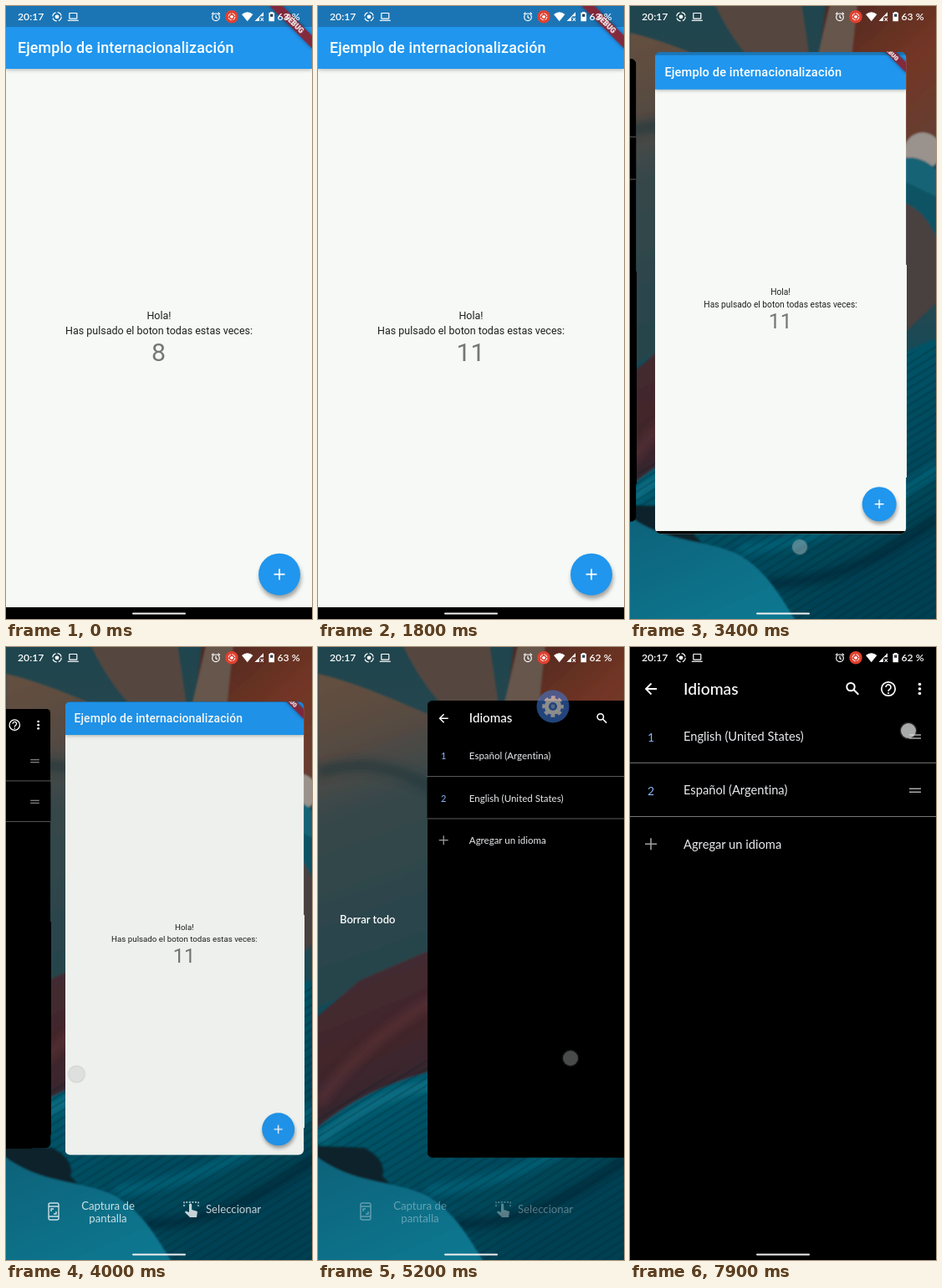
These frames come from a looping animation (366x732 px, 8000 ms). An HTML page:

```html
<!DOCTYPE html>
<html lang="es">
<head>
<meta charset="utf-8">
<title>Ejemplo de internacionalización</title>
<style>
html, body { margin: 0; width: 100%; height: 100%; overflow: hidden; background: #000; }
#stage { position: relative; width: 366px; height: 732px; overflow: hidden; }
#stage > * { position: absolute; left: 0; top: 0; }
svg { display: block; width: 366px; height: 732px; }
text { font-family: Lato, "Open Sans", sans-serif; font-variant-ligatures: none; fill: #fff; }
.mid { text-anchor: middle; }
.line { fill: none; stroke: #fff; }
.app text { font-family: Roboto, Arial, sans-serif; }
.app .body { font-size: 12.5px; fill: #1f1f1f; }
.app .count { font-size: 30.4px; fill: #757775; }
.item { font-size: 14.7px; fill: #e8eaed; }
.num { font-size: 14px; fill: #8ab4f8; }

.card { width: 366px; height: 732px; transform-origin: 0 0; }
.app { animation: app 8s ease-in-out infinite; }
.settings { animation: settings 8s ease-in-out infinite; }
.dim { animation: dim 8s linear infinite; }
.icon { animation: icon 8s ease-in-out infinite; }
.actions { animation: actions 8s linear infinite; }
.clear { animation: clear 8s linear infinite; }
.touch { animation: touch 8s linear infinite; }
.ripple { transform-origin: 327px 679px; animation: ripple 8s ease-out infinite; }
.rowA { animation: rowA 8s ease-in-out infinite; }
.rowB { animation: rowB 8s linear infinite; }
.step { animation: 8s step-end infinite; }
.n8 { animation-name: n8; } .n9 { animation-name: n9; }
.n10 { animation-name: n10; } .n11 { animation-name: n11; }
.b63 { animation-name: b63; } .b62 { animation-name: b62; }
.pre { animation-name: pre; } .post { animation-name: post; }

@keyframes n8 { 0% { opacity: 1 } 3.75%, 100% { opacity: 0 } }
@keyframes n9 { 0% { opacity: 0 } 3.75% { opacity: 1 } 10%, 100% { opacity: 0 } }
@keyframes n10 { 0% { opacity: 0 } 10% { opacity: 1 } 16.25%, 100% { opacity: 0 } }
@keyframes n11 { 0% { opacity: 0 } 16.25%, 100% { opacity: 1 } }
@keyframes b63 { 0% { opacity: 1 } 57.5%, 100% { opacity: 0 } }
@keyframes b62 { 0% { opacity: 0 } 57.5%, 100% { opacity: 1 } }
@keyframes pre { 0% { opacity: 1 } 87%, 100% { opacity: 0 } }
@keyframes post { 0% { opacity: 0 } 87%, 100% { opacity: 1 } }

@keyframes app {
  0%, 34% { transform: none; clip-path: inset(0 0 0 0 round 0px); }
  38% { transform: translate(14px, 17px) scale(.915); clip-path: inset(10px 0 5px 0 round 6px); animation-timing-function: ease-out; }
  42.5% { transform: translate(30px, 38.2px) scale(.82); clip-path: inset(20px 0 10px 0 round 8px); }
  47.5%, 49.2% { transform: translate(39.3px, 44.8px) scale(.785); clip-path: inset(24px 0 14px 0 round 8px); animation-timing-function: linear; }
  55% { transform: translate(263px, 57px) scale(.749); clip-path: inset(24px 0 14px 0 round 8px); animation-timing-function: ease-out; }
  58.75%, 60.6% { transform: translate(363px, 58px) scale(.749); clip-path: inset(24px 0 14px 0 round 8px); }
  65%, 100% { transform: translate(450px, 58px) scale(.749); clip-path: inset(24px 0 14px 0 round 8px); }
}
@keyframes settings {
  0%, 36% { transform: translate(-400px, 46px) scale(.79); clip-path: inset(24px 0 14px 0 round 8px); }
  42.5% { transform: translate(-282px, 47px) scale(.79); clip-path: inset(20px 0 12px 0 round 8px); }
  47.5%, 49.2% { transform: translate(-255px, 56px) scale(.755); clip-path: inset(24px 0 14px 0 round 8px); animation-timing-function: linear; }
  55% { transform: translate(-28px, 51.6px) scale(.76); clip-path: inset(24px 0 12px 0 round 8px); animation-timing-function: ease-out; }
  58.75%, 60.6% { transform: translate(38.4px, 43px) scale(.79); clip-path: inset(24px 0 14px 0 round 8px); animation-timing-function: ease-out; }
  65% { transform: translate(130.6px, 46px) scale(.785); clip-path: inset(23px 0 14px 0 round 8px); }
  68.1%, 70.6% { transform: translate(38.4px, 43px) scale(.79); clip-path: inset(24px 0 14px 0 round 8px); }
  75.6%, 100% { transform: none; clip-path: inset(0 0 0 0 round 0px); }
}
@keyframes dim { 0%, 49.2% { opacity: 0 } 55%, 100% { opacity: .24 } }
@keyframes icon {
  0%, 49.2% { transform: translate(-117px, 74px); opacity: 1; animation-timing-function: linear; }
  55% { transform: translate(111px, 70px); opacity: 1; animation-timing-function: ease-out; }
  58.75%, 60.6% { transform: translate(183px, 63px); opacity: 1; animation-timing-function: ease-out; }
  65% { transform: translate(281px, 71px); opacity: .55; }
  68.1%, 70.6% { transform: translate(183px, 63px); opacity: 1; }
  72.5%, 100% { transform: translate(183px, 50px); opacity: 0; }
}
@keyframes actions {
  0%, 45.5% { opacity: 0 } 48%, 49.2% { opacity: .9 } 53%, 55% { opacity: .35 }
  58.75%, 60.6% { opacity: .9 } 65% { opacity: .35 } 68.1%, 70.6% { opacity: .9 } 72.5%, 100% { opacity: 0 }
}
@keyframes clear { 0%, 61% { opacity: 0 } 64.5%, 65.5% { opacity: 1 } 68%, 100% { opacity: 0 } }
@keyframes ripple {
  0%, 2.4%, 5.5%, 8.7%, 11.8%, 15%, 18.5%, 100% { transform: scale(.2); opacity: 0; }
  2.5%, 8.8%, 15.1% { transform: scale(.2); opacity: .25; }
  5.4%, 11.7%, 18.4% { transform: scale(1); opacity: 0; }
}
@keyframes touch {
  0%, 2.4% { transform: translate(330px, 677px); opacity: 0; }
  2.5%, 3.7% { transform: translate(330px, 677px); opacity: 1; }
  3.8%, 8.7% { transform: translate(330px, 677px); opacity: 0; }
  8.8%, 9.9% { transform: translate(329px, 678px); opacity: 1; }
  10%, 15% { transform: translate(329px, 678px); opacity: 0; }
  15.1%, 16.2% { transform: translate(330px, 678px); opacity: 1; }
  16.3% { transform: translate(330px, 678px); opacity: 0; }
  16.4%, 31.2% { transform: translate(203px, 731px); opacity: 0; }
  31.25%, 34% { transform: translate(203px, 731px); opacity: 1; animation-timing-function: ease-out; }
  41.5% { transform: translate(203px, 646px); opacity: 1; }
  43.5%, 46% { transform: translate(203px, 646px); opacity: 0; }
  46.1%, 48.6% { transform: translate(54px, 511px); opacity: 0; }
  49.2% { transform: translate(54px, 511px); opacity: 1; }
  55% { transform: translate(271px, 504px); opacity: 1; }
  57% { transform: translate(318px, 501px); opacity: 0; }
  57.1%, 60.2% { transform: translate(212px, 495px); opacity: 0; }
  60.6% { transform: translate(212px, 495px); opacity: 1; animation-timing-function: ease-out; }
  64% { transform: translate(302px, 491px); opacity: 1; }
  65.8% { transform: translate(302px, 491px); opacity: 0; }
  66.3%, 69.2% { transform: translate(205px, 470px); opacity: 0; }
  69.4%, 70.6% { transform: translate(205px, 470px); opacity: 1; }
  71.4% { transform: translate(205px, 470px); opacity: 0; }
  71.5%, 79.8% { transform: translate(326px, 173px); opacity: 0; }
  80%, 83% { transform: translate(326px, 173px); opacity: 1; animation-timing-function: ease-in-out; }
  91%, 100% { transform: translate(333px, 100px); opacity: 1; }
}
@keyframes rowA { 0%, 86% { transform: none } 89%, 100% { transform: translateY(64.2px) } }
@keyframes rowB { 0%, 83% { transform: translateY(64.2px); animation-timing-function: ease-in-out; } 90.5%, 100% { transform: none } }
</style>
</head>
<body>
<div id="stage">

<!-- wallpaper -->
<svg viewBox="0 0 366 732">
  <defs>
    <linearGradient id="base" x2="0" y2="1">
      <stop offset="0" stop-color="#1f454e"/><stop offset=".4" stop-color="#33464a"/>
      <stop offset=".65" stop-color="#084c5d"/><stop offset="1" stop-color="#044558"/>
    </linearGradient>
    <linearGradient id="rock" x2=".25" y2="1">
      <stop offset="0" stop-color="#66503f"/><stop offset=".22" stop-color="#574b42"/>
      <stop offset=".42" stop-color="#37474a"/><stop offset="1" stop-color="#23444c"/>
    </linearGradient>
    <linearGradient id="rust" x2=".4" y2="1">
      <stop offset="0" stop-color="#4a2623"/><stop offset=".45" stop-color="#733625"/><stop offset="1" stop-color="#5a453d"/>
    </linearGradient>
    <linearGradient id="maroon" x2=".5" y2="1">
      <stop offset="0" stop-color="#443335"/><stop offset=".5" stop-color="#43262c"/><stop offset="1" stop-color="#2b2630"/>
    </linearGradient>
    <linearGradient id="teal" x2=".7" y2="1">
      <stop offset="0" stop-color="#086378"/><stop offset="1" stop-color="#034052"/>
    </linearGradient>
    <linearGradient id="hump" x2=".7" y2="1">
      <stop offset="0" stop-color="#0b6279"/><stop offset="1" stop-color="#0c7790"/>
    </linearGradient>
    <pattern id="grain" width="60" height="17" patternUnits="userSpaceOnUse" patternTransform="rotate(-32)">
      <path d="M0 3H60M0 12H60" stroke="#001c26" stroke-width="2.5" opacity=".22"/>
    </pattern>
    <filter id="haze" x="-10%" y="-10%" width="120%" height="120%"><feGaussianBlur stdDeviation="5"/></filter>
    <filter id="edge"><feGaussianBlur stdDeviation="1"/></filter>
  </defs>
  <rect width="366" height="732" fill="url(#base)"/>
  <g filter="url(#edge)">
    <path d="M0 32C70 48 130 84 235 120L275 350 130 370 0 430Z" fill="url(#rock)"/>
    <path d="M100 -5H205L225 130C160 90 125 50 100 -5Z" fill="#54473f"/>
    <path d="M235 -5H371V165L340 230 262 320 222 90Z" fill="url(#rust)"/>
    <path d="M222 70L240 -5H272L258 130Z" fill="#66564c"/>
    <path d="M318 190Q350 170 371 190V290L318 245Z" fill="#0b5363"/>
    <circle cx="350" cy="173" r="22" fill="#9a928c"/>
    <path d="M318 185Q345 172 371 200V230L318 205Z" fill="#126474"/>
    <path d="M318 232Q356 240 371 290V350L318 400Z" fill="#4a403f"/>
    <path d="M-5 445L50 398 150 355 280 345 275 440 130 515 -5 585Z" fill="url(#maroon)"/>
    <path d="M-5 578C45 535 90 520 130 508L270 438 371 395V737H-5Z" fill="url(#teal)"/>
  </g>
  <g filter="url(#haze)" fill="none" stroke-width="14">
    <path d="M0 150C60 130 110 150 145 175" stroke="#26393e" opacity=".7"/>
    <path d="M0 545C40 490 90 450 140 420" stroke="#67393a" opacity=".45"/>
    <path d="M0 590C60 540 110 525 150 520" stroke="#0f8096" opacity=".6"/>
    <path d="M130 650C220 640 290 610 370 550" stroke="#0a6f86" opacity=".6"/>
    <path d="M160 690C240 690 300 660 370 610" stroke="#022e3d" opacity=".8"/>
  </g>
  <path d="M0 560C90 490 250 460 366 400V732H0Z" fill="url(#grain)"/>
  <g filter="url(#edge)">
    <path d="M-5 596L55 598Q82 612 77 632L104 660Q30 655 -5 615Z" fill="#0c2029"/>
    <path d="M-5 606C40 642 90 636 130 655 165 676 180 705 200 737H-5Z" fill="url(#hump)"/>
  </g>
</svg>

<!-- recents actions -->
<svg viewBox="0 0 366 732">
  <text class="clear" x="26" y="329.5" font-size="13" font-weight="600">Borrar todo</text>
  <g class="actions" font-size="13.2">
    <g class="line" stroke-width="1.4">
      <rect x="51" y="664" width="12" height="20" rx="2"/>
      <path d="M51 668H63M51 680H63M54 674V671H57M60 674V677H57"/>
      <path d="M213 668V663H230V668" stroke-dasharray="2 1.6"/>
    </g>
    <path d="M219 666a1.6 1.6 0 0 1 3.2 0V672L229 674 228 681H220L214 675 215 673.5 219 675Z" fill="#fff"/>
    <text class="mid" x="122" y="671.5">Captura de</text>
    <text class="mid" x="122" y="687">pantalla</text>
    <text x="239" y="675.5">Seleccionar</text>
  </g>
</svg>

<!-- counter app -->
<div class="card app">
<svg viewBox="0 0 366 732">
  <defs>
    <filter id="soft" x="-30%" y="-60%" width="160%" height="250%"><feGaussianBlur stdDeviation="2.5"/></filter>
  </defs>
  <rect width="366" height="732" fill="#f6f9f5"/>
  <rect y="60" width="366" height="16" fill="#000" opacity=".3" filter="url(#soft)"/>
  <rect width="366" height="75" fill="#2096ee"/>
  <rect width="366" height="25" fill="#1b75b5"/>
  <text x="14" y="56.3" font-size="17.86" font-weight="500" letter-spacing=".13">Ejemplo de internacionalización</text>
  <text class="body mid" x="183" y="373.8">Hola!</text>
  <text class="body mid" x="183" y="392.3">Has pulsado el boton todas estas veces:</text>
  <text class="count mid step n8" x="182.5" y="423.5">8</text>
  <text class="count mid step n9" x="182.5" y="423.5">9</text>
  <text class="count mid step n10" x="182.5" y="423.5">10</text>
  <text class="count mid step n11" x="182.5" y="423.5">11</text>
  <circle cx="328" cy="683" r="25" fill="#000" opacity=".35" filter="url(#soft)"/>
  <circle cx="327" cy="678.7" r="25" fill="#2096ee"/>
  <circle class="ripple" cx="327" cy="679" r="25" fill="#fff"/>
  <path class="line" d="M320.5 678.7H333.5M327 672.2V685.2" stroke-width="1.8"/>
  <g transform="translate(366 0) rotate(45)">
    <rect x="-36" y="25" width="72" height="10.7" fill="#000" opacity=".4" filter="url(#soft)"/>
    <rect x="-36" y="25" width="72" height="10.7" fill="#8d2436" opacity=".92"/>
    <text class="mid" y="33.4" font-size="8.6" font-weight="900">DEBUG</text>
  </g>
  <rect y="718" width="366" height="14"/>
  <rect class="dim" width="366" height="732"/>
</svg>
</div>

<!-- language settings -->
<div class="card settings">
<svg viewBox="0 0 366 732">
  <rect width="366" height="732"/>
  <path class="line" d="M32 50H19M25.5 43.5L19 50 25.5 56.5" stroke-width="1.8"/>
  <text x="64" y="56.5" font-size="19.3" font-weight="500">Idiomas</text>
  <g class="line" stroke-width="2">
    <circle cx="264" cy="47.6" r="4.7"/><path d="M267.5 51L273.3 56.8"/>
    <circle cx="309" cy="50" r="8.2" stroke-width="1.7"/>
    <path d="M306 48a3 3 0 1 1 4.6 2.5Q309 51.5 309 53" stroke-width="1.6"/>
    <path d="M309 54.3V56" stroke-width="1.8"/>
  </g>
  <g fill="#fff"><circle cx="346.5" cy="44.5" r="1.8"/><circle cx="346.5" cy="50" r="1.8"/><circle cx="346.5" cy="55.5" r="1.8"/></g>
  <g class="rowA">
    <text class="num mid step pre" x="25" y="112.5">1</text>
    <text class="num mid step post" x="25" y="112.5">2</text>
    <text class="item" x="64" y="112.3">Español (Argentina)</text>
    <path d="M334 105H348M334 109H348" stroke="#a8a8a8" stroke-width="1.5"/>
    <path d="M0 138.3H366" stroke="#777"/>
  </g>
  <g class="rowB">
    <rect y="76" width="366" height="63"/>
    <text class="num mid step pre" x="25" y="112.5">2</text>
    <text class="num mid step post" x="25" y="112.5">1</text>
    <text class="item" x="64" y="112.3">English (United States)</text>
    <path d="M334 105H348M334 109H348" stroke="#a8a8a8" stroke-width="1.5"/>
    <path d="M0 138.3H366" stroke="#777"/>
  </g>
  <path d="M18 235.3H32M25 228.3V242.3" stroke="#a0a0a0" stroke-width="1.6"/>
  <text class="item" x="64" y="240.5">Agregar un idioma</text>
</svg>
</div>

<svg viewBox="0 0 366 732">
  <!-- settings badge -->
  <g class="icon">
    <circle r="19.5" fill="#3f7de0"/>
    <g fill="none" stroke="#fff">
      <circle r="7.6" stroke-width="5"/>
      <circle r="11" stroke-width="3.6" stroke-dasharray="4.8 3.839" stroke-dashoffset="2.4"/>
    </g>
    <circle r="2.4" fill="#fff" opacity=".5"/>
  </g>

  <!-- status bar -->
  <g font-size="12.2" font-weight="600">
    <text x="14" y="17.3">20:17</text>
    <text class="step b63" x="324.5" y="17.3">63 %</text>
    <text class="step b62" x="324.5" y="17.3">62 %</text>
  </g>
  <g class="line" stroke-width="1.2">
    <circle cx="61" cy="12.8" r="5.2" stroke-dasharray="6 2.17"/>
    <rect x="75.8" y="8.5" width="9" height="6.6" rx=".6"/>
    <path d="M73.8 17.3H86.8"/>
    <circle cx="251" cy="13.3" r="4.3"/>
    <path d="M251 10.8V13.6L253 14.8M246 9.8L248.4 7.8M256 9.8L253.6 7.8"/>
  </g>
  <circle cx="61" cy="12.8" r="2.4" fill="#fff"/>
  <circle cx="270" cy="12.8" r="7.7" fill="#e2402f"/>
  <circle class="line" cx="270" cy="12.8" r="4" stroke-width="1" stroke-dasharray="4.8 1.48"/>
  <circle cx="270" cy="12.8" r="1.9" fill="#fff"/>
  <g fill="#fff">
    <path d="M282 10Q288.7 4.7 295.4 10L288.7 18.2Z"/>
    <path d="M308 7.3V12.2H304.5L303 14V18H297.5Z"/>
    <path d="M316 8V7H319.4V8H321V18.2H314.4V8Z"/>
  </g>
  <path d="M304.5 14L308 17.8M308 14L304.5 17.8" stroke="#fff" stroke-width="1.1"/>
  <rect x="316" y="9.6" width="3.4" height="3.2" fill="#345"/>
  <rect x="151" y="724.5" width="64" height="2" rx="1" fill="#f2f2f2"/>

  <!-- finger -->
  <g class="touch">
    <circle r="10.5" fill="#909090" opacity=".25"/>
    <circle r="9" fill="#e2e4e4" opacity=".7"/>
  </g>
</svg>
</div>
</body>
</html>
```
